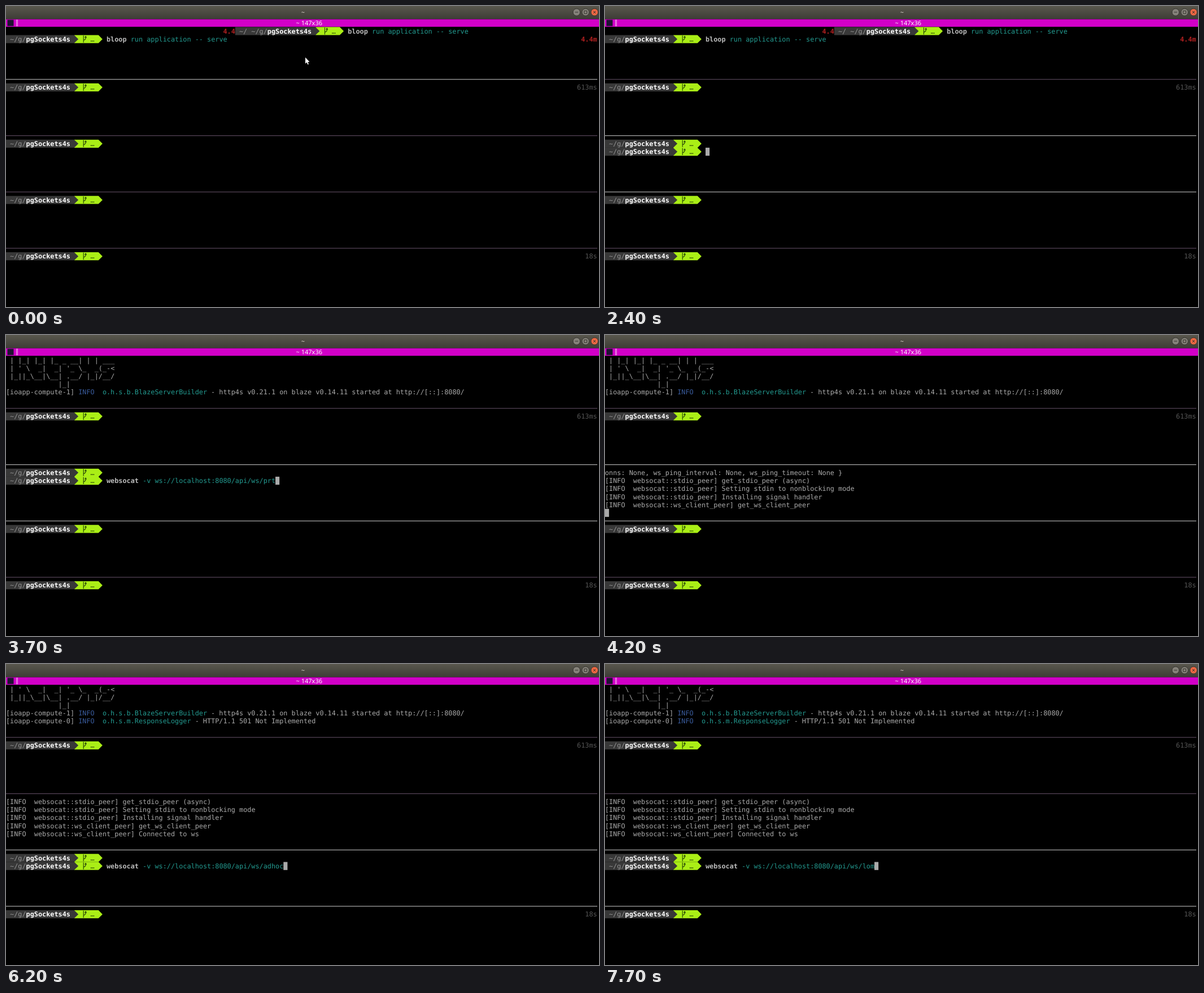
These frames come from a looping animation (1050x533 px, 8 s). An HTML page:

```html
<!DOCTYPE html>
<html lang="en">
<head>
<meta charset="utf-8">
<title>Terminal</title>
<style>
  html, body { margin: 0; width: 100%; height: 100%; overflow: hidden; background: #000; }
  svg { display: block; width: 1050px; height: 533px; }
  text { white-space: pre; text-rendering: geometricPrecision; }
  .mono { font: 11.83px "DejaVu Sans Mono", monospace; }
  .bold { font-weight: bold; }
  .ui { font: 11px "Noto Sans", sans-serif; text-anchor: middle; }
</style>
</head>
<body>
<svg viewBox="0 0 1050 533">
  <defs>
    <linearGradient id="bar" x2="0" y2="1">
      <stop offset="0" stop-color="#59574d"/>
      <stop offset="1" stop-color="#3d3c36"/>
    </linearGradient>
  </defs>
  <rect width="1050" height="533"/>
  <rect width="1050" height="23.5" fill="url(#bar)"/>
  <text class="ui bold" x="526" y="15" fill="#e4e0d8">~</text>
  <g stroke="#33322d" stroke-width="1">
    <circle cx="1010.3" cy="11" r="6.3" fill="#85827a"/>
    <circle cx="1026.2" cy="11" r="6.3" fill="#85827a"/>
    <circle cx="1042.1" cy="11" r="6.3" fill="#ee6843"/>
    <path d="M1007.6 11h5.4M1023.8 8.6h4.8v4.8h-4.8zM1040 8.9l4.2 4.2m0-4.2l-4.2 4.2" fill="none"/>
  </g>
  <rect y="23.5" width="1050" height="13.3" fill="#d200c8"/>
  <rect x="2.5" y="24.5" width="11" height="11" fill="#1d1230"/>
  <path d="M18.6 24v12M20.4 24v12" stroke="#f3c4f0" stroke-width=".9"/>
  <text class="ui" x="536.8" y="34" fill="#fff">~ 147x36</text>
  <g id="screen"></g>
</svg>
<script>
const LOOP = 8000, COL = 7.12, ROW = 14.24, PITCH = ROW * 7, TOP = 37.3;
const GREY = '#aaaaaa', TEAL = '#239a90', DIM = '#555555', RED = '#b02020', BLUE = '#3a5c9e';
const GREEN = '#aaee16', SLATE = '#383838', INK = '#2b4a08';

const screen = document.getElementById('screen');
const rowY = (pane, row) => TOP + pane * PITCH + row * ROW;
const esc = s => s.replace(/&/g, '&amp;').replace(/</g, '&lt;');

function put(pane, row, col, str, fill = GREY, bold = false) {
  const x = (col * COL).toFixed(2), y = (rowY(pane, row) + 11.2).toFixed(2);
  return `<text class="mono${bold ? ' bold' : ''}" x="${x}" y="${y}" fill="${fill}">${esc(str)}</text>`;
}

// Shell prompt: grey path segment, then a green branch arrow.
function prompt(pane, row, col = 0, lead = '') {
  const y = rowY(pane, row), x = col * COL, n = 17 + lead.length;
  const a = x + n * COL, tip = a + 6 * COL, mid = y + ROW / 2, end = y + ROW;
  return `<rect x="${x}" y="${y}" width="${n * COL}" height="${ROW}" fill="${SLATE}"/>
    <path d="M${a} ${y}H${tip}L${tip + COL} ${mid}L${tip} ${end}H${a}z" fill="${GREEN}"/>
    <path d="M${a - .3} ${y}L${a + COL} ${mid}L${a - .3} ${end}z" fill="${SLATE}"/>
    <path d="M${a + 16.2} ${y + .8}v12.4M${a + 20} ${y + 3.4}v2.2q0 2-3.8 3.6M${a + 18.5} ${y + 4.6}l1.5-2.4 1.5 2.4"
      fill="none" stroke="${INK}" stroke-width="1.2"/>`
    + put(pane, row, col + n + 4, '…', INK)
    + put(pane, row, col + 1, lead + '~/g/', '#929292')
    + put(pane, row, col + 5 + lead.length, 'pgSockets4s', '#ffffff', true);
}

function command(pane, row, col, line) {
  const cut = line.indexOf(' ');
  return put(pane, row, col, line.slice(0, cut), '#bcbcbc', true)
    + put(pane, row, col + cut + 1, line.slice(cut + 1), TEAL);
}

function logLine(row, thread, logger, message) {
  return put(0, row, 0, `[ioapp-compute-${thread}]`) + put(0, row, 18, 'INFO', BLUE)
    + put(0, row, 24, logger, TEAL) + put(0, row, 25 + logger.length, '- ' + message);
}

const serve = 'bloop run application -- serve';
const banner = [
  ' | |_| |_| |_ _ __| | | ___',
  " | ' \\  _|  _| '_ \\_  _(_-<",
  ' |_||_\\__|\\__| .__/ |_|/__/',
  '             |_|'
];
const info = (mod, msg) => `[INFO  websocat::${mod}] ${msg}`;
const client = [
  'onns: None, ws_ping_interval: None, ws_ping_timeout: None }',
  info('stdio_peer', 'get_stdio_peer (async)'),
  info('stdio_peer', 'Setting stdin to nonblocking mode'),
  info('stdio_peer', 'Installing signal handler'),
  info('ws_client_peer', 'get_ws_client_peer'),
  info('ws_client_peer', 'Connected to ws')
];
const connect = path => 'websocat -v ws://localhost:8080/api/ws/' + path;

function server(stage) {
  if (!stage) {
    return put(0, 0, 54, '4.4', RED, true) + prompt(0, 0, 57, '~/ ') + command(0, 0, 85, serve)
      + prompt(0, 1) + command(0, 1, 25, serve) + put(0, 1, 143, '4.4m', RED, true);
  }
  const art = banner.slice(stage - 1);
  let out = art.map((s, i) => put(0, i, 0, s)).join('')
    + logLine(art.length, 1, 'o.h.s.b.BlazeServerBuilder',
      'http4s v0.21.1 on blaze v0.14.11 started at http://[::]:8080/');
  if (stage > 1) out += logLine(4, 0, 'o.h.s.m.ResponseLogger', 'HTTP/1.1 501 Not Implemented');
  return out;
}

// A pane with one or two prompts and an optional command on the second.
function shell(pane, prompts, line) {
  return prompt(pane, 0) + (prompts > 1 ? prompt(pane, 1) : '') + (line ? command(pane, 1, 25, line) : '');
}

const clientPane = from => client.slice(from, from + 5).map((s, i) => put(2, i, 0, s)).join('');

function mouse([x, y]) {
  return `<path transform="translate(${x} ${y})" fill="#fff"
    d="M0 0V11L2.6 8.8L4.3 12.8L6 12L4.3 8.2L7.5 7.9z"/>`;
}

// Each step overrides part of the state; block is [pane, row, col].
const steps = [
  [0, { focus: 0, server: 0, mouse: [530, 91], block: null, p3: 1, l3: '', out: -1, p4: 1, l4: '' }],
  [200, { mouse: [529.4, 86] }],
  [500, { block: [0, 1, 55] }],
  [600, { mouse: null }],
  [700, { block: [0, 2, 0] }],
  [1200, { block: null }],
  [1300, { block: [0, 2, 0] }],
  [1700, { focus: 1, block: [1, 0, 25] }],
  [1800, { focus: 2, block: [2, 0, 25] }],
  [2400, { p3: 2, block: [2, 1, 25] }],
  [2600, { server: 1 }],
  [2700, { l3: connect('prt'), block: [2, 1, 67] }],
  [3100, { block: null }],
  [3700, { block: [2, 1, 67] }],
  [4200, { out: 0, block: [2, 5, 0] }],
  [5200, { server: 2, out: 1, focus: 3, block: [3, 0, 25] }],
  [5400, { block: [3, 1, 0] }],
  [5500, { p4: 2, block: [3, 1, 25] }],
  [6200, { l4: connect('adhoc'), block: [3, 1, 69] }],
  [6400, { block: null }],
  [6800, { block: [3, 1, 69] }],
  [7200, { l4: 'bloop clean application', block: [3, 1, 48] }],
  [7400, { block: null }],
  [7700, { l4: connect('lom'), block: [3, 1, 67] }]
];
let last = {};
const states = steps.map(([at, change]) => [at, last = { ...last, ...change }]);

function draw(s) {
  let out = '';
  for (let i = 1; i < 5; i++) {
    const lit = s.focus === i || s.focus === i - 1;
    out += `<rect y="${29.7 + i * PITCH}" width="1047" height="1.1" fill="${lit ? '#bdbdbd' : '#604c62'}"/>`;
  }
  out += server(s.server) + shell(1, 1) + put(1, 0, 142, '613ms', DIM)
    + (s.out < 0 ? shell(2, s.p3, s.l3) : clientPane(s.out))
    + shell(3, s.p4, s.l4) + shell(4, 1) + put(4, 0, 144, '18s', DIM);
  if (s.block) {
    const [pane, row, col] = s.block;
    out += `<rect x="${col * COL}" y="${rowY(pane, row)}" width="${COL}" height="${ROW}" fill="${GREY}"/>`;
  }
  if (s.mouse) out += mouse(s.mouse);
  screen.innerHTML = out;
}

let shown = null;
function tick() {
  const t = performance.now() % LOOP;
  const state = states.filter(([at]) => at <= t).pop()[1];
  if (state !== shown) draw(shown = state);
  requestAnimationFrame(tick);
}
tick();
</script>
</body>
</html>
```
